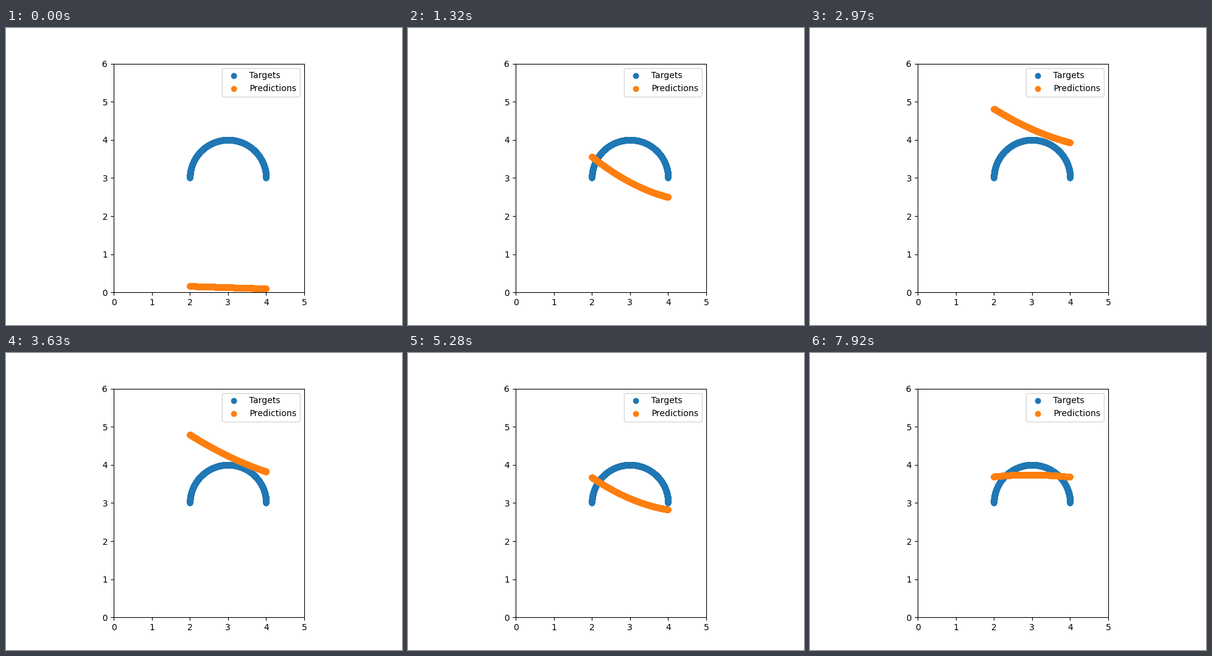
Write a matplotlib script that moves like this. It is 640 by 480 pixels and loops after 8 s.

```python
import numpy as np
import matplotlib.pyplot as plt
from matplotlib.animation import FuncAnimation

LOOP, TICK, STEP = 8000, 40, 330  # ms

# Turning points (training step, value) of the overshooting fit
HEIGHT = [(0, 0.13), (1, 3.71), (2.2, 4.57), (5.05, 2.37), (9.7, 4.49),
          (15, 3.2), (21, 3.925), (27, 3.45)]
DROP = [(0, 0.065), (1, 0.45), (2.4, 0.5), (5.1, 1.37), (9.5, 0.87),
        (13, 1.12), (22, 0.02), (27, 0)]
BOW = [(0, 0), (5.5, -0.165), (10.5, -0.07), (15, -0.135), (24, 0.055),
       (27, 0.06)]


def swing(step, turns):
    """Cosine easing from one turning point to the next."""
    for (t0, v0), (t1, v1) in zip(turns, turns[1:]):
        if step <= t1:
            ease = (1 - np.cos(np.pi * (step - t0) / (t1 - t0))) / 2
            return v0 + (v1 - v0) * ease


theta = np.linspace(np.pi, 0, 1000)
u = np.cos(theta)
x = 3 + u


def predict(step):
    height, drop, bow = (swing(step, turns) for turns in (HEIGHT, DROP, BOW))
    return height - u * drop / 2 + bow * (1 - u**2)


fig, ax = plt.subplots(figsize=(6.4, 4.8), dpi=100)
ax.set_aspect("equal")
ax.set_xlim(0, 5)
ax.set_ylim(0, 6)
ax.scatter(x, 3 + np.sin(theta), label="Targets")
points = ax.scatter(x, predict(0), label="Predictions")
ax.legend(loc="upper right")


def update(frame):
    step = (frame * TICK + TICK - 1) // STEP
    points.set_offsets(np.column_stack([x, predict(step)]))
    return (points,)


anim = FuncAnimation(fig, update, frames=LOOP // TICK, interval=TICK,
                     repeat=True, repeat_delay=0)
plt.show()
```
